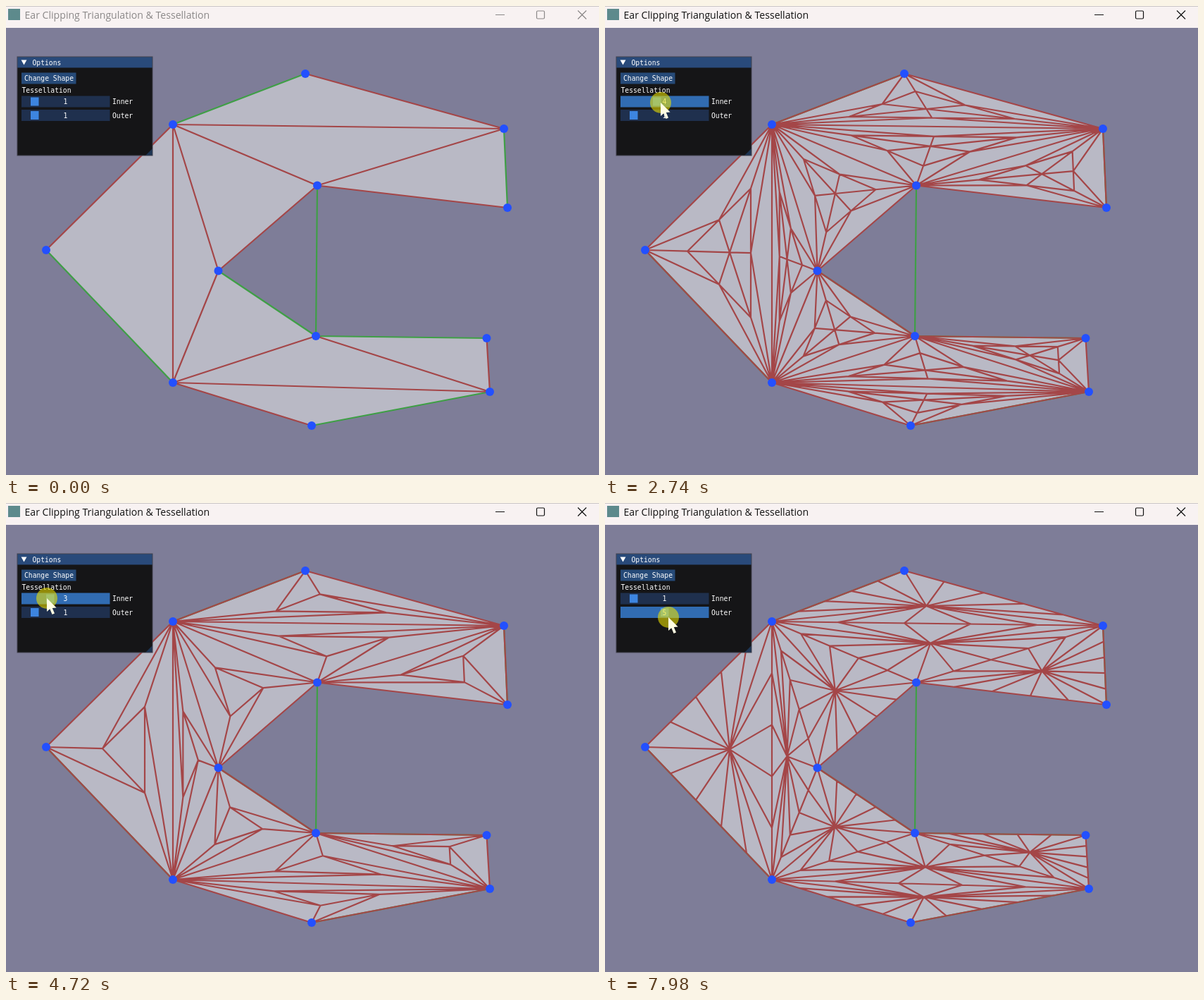
An HTML page with a canvas that plays this animation: 842 px wide and 665 px high, repeating every 8 s.

```html
<!DOCTYPE html>
<html lang="en">
<head>
<meta charset="utf-8">
<title>Ear Clipping Triangulation &amp; Tessellation</title>
<style>
  html, body { margin: 0; width: 100%; height: 100%; overflow: hidden; background: #7e7d98; }
  canvas { display: block; }
</style>
</head>
<body>
<canvas id="stage" width="842" height="665"></canvas>
<script>
const ctx = document.getElementById('stage').getContext('2d');
const LOOP = 8000;

const P = {
  A: [237, 168], B: [425, 96], C: [707, 174], D: [712, 286],
  E: [442, 254.5], F: [301.5, 375.5], G: [440, 468], H: [682.5, 471],
  I: [687, 547], J: [434, 595], K: [237, 534], L: [57, 346]
};
const OUTLINE = 'ABCDEFGHIJKL';
const TRIANGLES = ['ACB', 'AEC', 'EDC', 'AFE', 'AKF', 'ALK', 'FKG', 'GIH', 'GKI', 'KJI'];
// Edges left without a wire while both levels are 1
const BARE = ['BA', 'DC', 'LK', 'GF', 'HG', 'JI'];

const RED = '#a44648', GREEN = '#3f9f46';

// Pointer path: time, x, y
const PATH = [
  [70, 3, 18], [140, 17, 95], [210, 32, 150], [350, 41, 136], [750, 41, 135],
  [1300, 47, 135], [1510, 47, 135], [1920, 57, 135], [2330, 67, 136], [2390, 68, 136],
  [2740, 79, 137], [3140, 78, 137], [3420, 91, 138], [3620, 91, 138], [4040, 75, 137],
  [4240, 75, 137], [4450, 63, 136], [4600, 63, 136], [4720, 58, 135], [4930, 54, 135],
  [5190, 54, 135], [5260, 49, 135], [5460, 49, 135], [5670, 44, 135], [5870, 44, 137],
  [5940, 43, 157], [6210, 43, 157], [6750, 58, 159], [6890, 65, 159], [7030, 65, 159],
  [7310, 74, 160], [7510, 74, 160], [7980, 90, 162]
];

const lerp = (a, b, f) => a + (b - a) * f;
const mix = (p, q, f) => [lerp(p[0], q[0], f), lerp(p[1], q[1], f)];

function pointerAt(t) {
  if (t < PATH[0][0]) return null;
  const i = PATH.findIndex(k => k[0] > t);
  if (i < 0) return PATH[PATH.length - 1].slice(1);
  const a = PATH[i - 1], b = PATH[i];
  return mix(a.slice(1), b.slice(1), (t - a[0]) / (b[0] - a[0]));
}

// Slider value under a pointer position, for a range of 0 to 10
const valueAt = x => Math.max(0, Math.min(10, Math.round((x - 30) / 11)));

function stateAt(t) {
  const pointer = pointerAt(t);
  const dragInner = t >= 750 && t < 5870;
  const dragOuter = t >= 6210;
  return {
    pointer, dragInner, dragOuter,
    focused: t >= 750,
    inner: dragInner ? valueAt(pointer[0]) : 1,
    outer: dragOuter ? valueAt(pointer[0]) : 1
  };
}

function line(p, q) {
  ctx.moveTo(p[0], p[1]);
  ctx.lineTo(q[0], q[1]);
}

function rect(x, y, w, h, color) {
  ctx.fillStyle = color;
  ctx.fillRect(x, y, w, h);
}

// Corners of a concentric ring, moved inward by share t per corner
function ringCorners(tri, t) {
  return tri.map((c, i) => {
    const a = tri[(i + 1) % 3], b = tri[(i + 2) % 3];
    return [0, 1].map(k => c[k] * (1 - 2 * t) + (a[k] + b[k]) * t);
  });
}

function split(p, q, n) {
  return Array.from({ length: n + 1 }, (_, i) => n ? mix(p, q, i / n) : p);
}

// Joins one side of a ring to the same side of the next ring
function stitch(out, ins) {
  const oSegs = out.length - 1, iSegs = ins.length - 1;
  const oHalf = oSegs >> 1, iHalf = iSegs >> 1;
  let o = 0, i = 0;
  const link = () => line(out[o], ins[i]);
  const stepOut = () => { o++; link(); };
  const stepIn = () => { i++; link(); };
  link();
  const order = [];
  for (let k = 0; k < Math.max(oHalf, iHalf + 1); k++) {
    if (k > 0 && k <= iHalf) order.push(stepIn);
    if (k < oHalf) order.push(stepOut);
  }
  order.forEach(step => step());
  if (iSegs % 2) stepIn();
  if (oSegs % 2) stepOut();
  order.reverse().forEach(step => step());
}

function tessellate(tri, inner, outer) {
  const n = Math.max(inner, 2);
  let corners = tri, segs = outer;
  for (let k = 1; segs > 0; k++) {
    const next = n - 2 * k;
    const inside = next >= 0 ? ringCorners(tri, 2 * k / (3 * n)) : null;
    for (let e = 0; e < 3; e++) {
      const f = (e + 1) % 3;
      line(corners[e], corners[f]);
      if (inside) stitch(split(corners[e], corners[f], segs), split(inside[e], inside[f], next));
    }
    if (!inside) break;
    corners = inside;
    segs = next;
  }
}

function drawShape(inner, outer) {
  const pts = [...OUTLINE].map(c => P[c]);
  ctx.beginPath();
  pts.forEach(p => ctx.lineTo(p[0], p[1]));
  ctx.closePath();
  ctx.fillStyle = '#b9b9c5';
  ctx.fill();

  ctx.lineWidth = 2.2;
  ctx.lineCap = 'round';
  ctx.strokeStyle = GREEN;
  ctx.beginPath();
  BARE.forEach(([a, b]) => line(P[a], P[b]));
  line(P.E, P.G);
  ctx.stroke();

  ctx.strokeStyle = RED;
  ctx.beginPath();
  for (const name of TRIANGLES) {
    const tri = [...name].map(c => P[c]);
    if (inner > 1 || outer > 1) {
      tessellate(tri, inner, outer);
      continue;
    }
    for (let e = 0; e < 3; e++) {
      const a = name[e], b = name[(e + 1) % 3];
      if (!BARE.includes(a + b) && !BARE.includes(b + a)) line(P[a], P[b]);
    }
  }
  ctx.stroke();

  ctx.fillStyle = '#2350ff';
  for (const [x, y] of pts) {
    ctx.beginPath();
    ctx.arc(x, y, 6, 0, 7);
    ctx.fill();
  }
}

function drawTitleBar(focused) {
  rect(0, 0, 842, 31, '#f8f2f2');
  rect(0, 0, 842, 1, '#cbc6c6');
  rect(3, 4, 17, 16, '#5d8a8c');
  const ink = focused ? '#111111' : '#8b8888';
  ctx.fillStyle = ink;
  ctx.font = '14.1px "Open Sans", "Noto Sans", sans-serif';
  ctx.textAlign = 'left';
  ctx.fillText('Ear Clipping Triangulation & Tessellation', 26.5, 17.5);
  ctx.strokeStyle = ink;
  ctx.lineWidth = 1.2;
  ctx.lineCap = 'butt';
  ctx.beginPath();
  line([695, 12.5], [708, 12.5]);
  line([812, 6.5], [824, 18.5]);
  line([824, 6.5], [812, 18.5]);
  ctx.roundRect(753.5, 7, 11, 11, 1.5);
  ctx.stroke();
}

function label(text, x, y, align = 'left') {
  ctx.fillStyle = '#ffffff';
  ctx.textAlign = align;
  ctx.fillText(text, x, y);
}

function slider(y, value, name, active, pointer) {
  const hover = pointer && pointer[0] >= 22 && pointer[0] <= 147 &&
    pointer[1] >= y && pointer[1] < y + 16;
  rect(22, y, 125.5, 16, active ? '#316cb2' : hover ? '#26476f' : '#1f304e');
  rect(35 + 11 * (value - 1), y + 2, 11.5, 12, active ? '#4296fa' : '#3d85e0');
  label(value, 84.5, y + 11.5, 'center');
  label(name, 151, y + 11.5);
}

function drawPanel(s) {
  rect(16, 72, 192, 140, '#151517');
  rect(16, 72, 192, 15.5, '#294a7a');
  ctx.fillStyle = '#1d3554';
  ctx.beginPath();
  line([208, 202], [208, 212]);
  ctx.lineTo(198, 212);
  ctx.fill();
  ctx.strokeStyle = '#42424f';
  ctx.lineWidth = 1;
  ctx.strokeRect(16, 72, 192, 140);

  ctx.fillStyle = '#ffffff';
  ctx.beginPath();
  line([21.5, 76.5], [29.5, 76.5]);
  ctx.lineTo(25.5, 83.5);
  ctx.fill();

  ctx.font = '9.7px "DejaVu Sans Mono", "Liberation Mono", monospace';
  label('Options', 37.5, 83.5);
  rect(22, 94.5, 77.5, 16, '#264a78');
  label('Change Shape', 26, 106);
  label('Tessellation', 22.5, 122.5);
  const idle = !s.dragInner && !s.dragOuter;
  slider(127.5, s.inner, 'Inner', s.dragInner, idle && s.pointer);
  slider(147, s.outer, 'Outer', s.dragOuter, idle && s.pointer);
}

function drawPointer([x, y], pressed) {
  if (pressed) {
    ctx.fillStyle = 'rgba(238, 225, 0, 0.58)';
    ctx.beginPath();
    ctx.arc(x, y, 15, 0, 7);
    ctx.fill();
  }
  ctx.save();
  ctx.translate(x, y);
  ctx.beginPath();
  [[0, 0], [0, 19], [4.3, 15.2], [7.6, 23], [11, 21.5], [7.8, 14], [13.6, 13.6]]
    .forEach(p => ctx.lineTo(p[0], p[1]));
  ctx.closePath();
  ctx.fillStyle = pressed ? '#fffde2' : '#ffffff';
  ctx.fill();
  ctx.restore();
}

function draw(t) {
  const s = stateAt(t);
  rect(0, 0, 842, 665, '#7e7d98');
  drawShape(s.inner, s.outer);
  drawTitleBar(s.focused);
  drawPanel(s);
  if (s.pointer) drawPointer(s.pointer, s.dragInner || s.dragOuter);
}

const start = performance.now();
function tick() {
  draw((performance.now() - start) % LOOP);
  requestAnimationFrame(tick);
}
tick();
</script>
</body>
</html>
```
